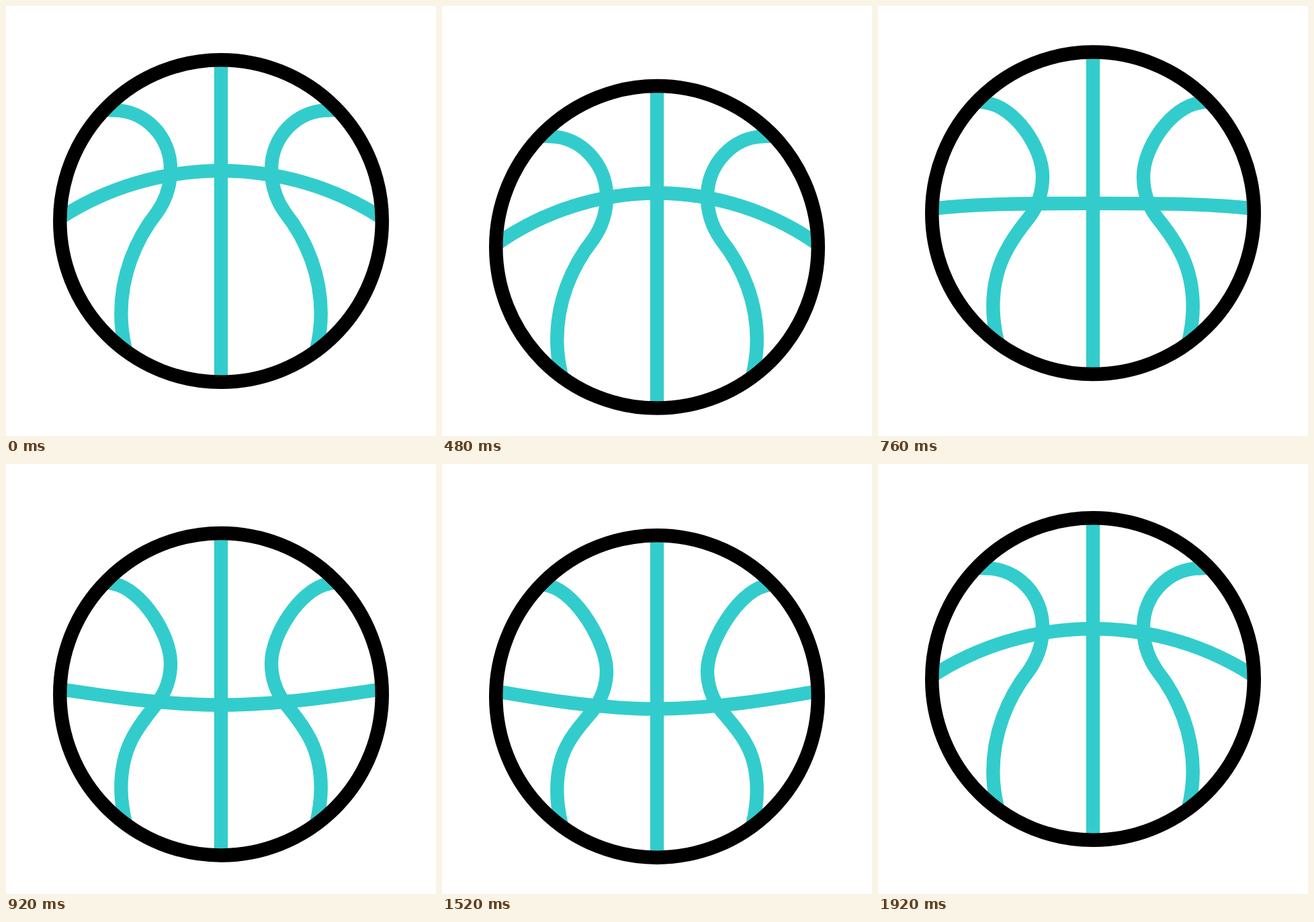
These frames come from a looping animation (640 px wide and 640 px high, 2 s). An HTML page:

```html
<!DOCTYPE html>
<html lang="en">
<head>
<meta charset="utf-8">
<title>Bouncing ball</title>
<style>
  html, body { margin: 0; width: 100%; height: 100%; overflow: hidden; background: #fff; }
  svg { display: block; width: 100%; height: 100%; }
  path { fill: none; stroke: #3cc; stroke-width: 20.4; }
  circle { fill: none; stroke: #000; stroke-width: 20.5; }
</style>
</head>
<body>
<svg viewBox="0 0 640 640">
  <g id="ball">
    <path d="M320 80V560"/>
    <g id="half">
      <path id="seam"/>
      <path id="belt"/>
    </g>
    <use href="#half" transform="matrix(-1 0 0 1 640 0)"/>
    <circle cx="320" cy="320" r="239.75"/>
  </g>
</svg>
<script>
const LOOP = 2000, STEP = 40;
const $ = id => document.getElementById(id);

// Eased progress from 0 to 1 between two times
function ease(t, from, to, power = 1) {
  const u = Math.min(1, Math.max(0, (t - from) / (to - from))) ** power;
  return u * u * (3 - 2 * u);
}

// Height of the ball: up, down, small rebound, settle
const drop = t => -56.5 * ease(t, 80, 280) + 103 * ease(t, 280, 520)
                - 61 * ease(t, 520, 720) + 41.5 * ease(t, 720, 970);

// Sag of the lines: 0 at rest, 1 when settled, below 0 while the ball is up
const beltSag = t => -0.22 * ease(t, 80, 320) + 1.22 * ease(t, 320, 1020);
const seamSag = t => -0.26 * ease(t, 80, 320) + 0.79 * ease(t, 320, 700)
                   + 0.47 * ease(t, 700, 1160);

// Side seam: top end, widest point, waist, foot
const seamPath = s => `M148 ${154.5 - 2.5 * s}L161 ${155.2 + 0.8 * s}
  C${207 - 7 * s} ${155.2 + 11.8 * s} 245 ${194.5 + 48.5 * s} 245 ${243 + 41 * s}
  C245 ${266 + 38 * s} ${239 - s} ${287 + 39 * s} ${225 - s} ${307 + 36 * s}
  C${191 + 4 * s} ${350 + 28 * s} 171.3 ${403 - 3 * s} 171.3 ${458 + 2 * s}
  C171.3 478 174 495 178 512`;

// Half of the belt, from the ring to just past the middle
function beltPath(s) {
  const mid = 245.3 + 97.2 * s;
  return `M80 ${316 - 4 * s}C151 ${269.6 + 57.4 * s} 234.8 ${mid} 320 ${mid}h1`;
}

function draw(t) {
  const keep = 1 - ease(t, 1480, 1920, 0.88);
  $('ball').setAttribute('transform', `translate(0 ${drop(t) * keep})`);
  $('seam').setAttribute('d', seamPath(seamSag(t) * keep));
  $('belt').setAttribute('d', beltPath(beltSag(t) * keep));
}

const start = performance.now();
function tick() {
  const t = (performance.now() - start) % LOOP;
  draw(Math.floor(t / STEP) * STEP);
  requestAnimationFrame(tick);
}
tick();
</script>
</body>
</html>
```
